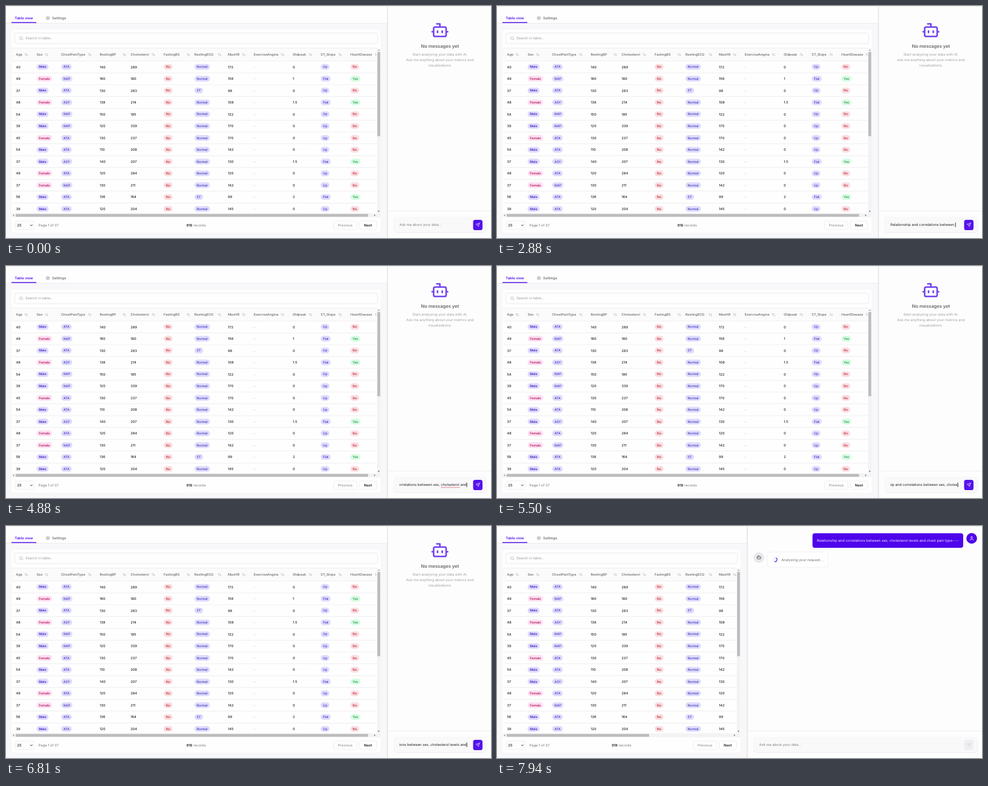
An HTML page for the animation above (8 s loop, 800 by 383 pixels).

```html
<!DOCTYPE html>
<html lang="en">
<head>
<meta charset="utf-8">
<title>Table and chat</title>
<style>
html, body { margin: 0; width: 100%; height: 100%; overflow: hidden; background: #fff; }
svg { display: block; width: 100vw; height: 100vh; }
text { font-family: Inter, sans-serif; white-space: pre; text-rendering: geometricPrecision; }
</style>
</head>
<body>
<svg id="stage" viewBox="0 0 800 383"></svg>
<script>
const LOOP = 8000, SEND = 7440, WIDE = 629, NARROW = 412.5;
const PURPLE = '#5512ec', INK = '#1f1f23', GRAY = '#77777d', PALE = '#9c9ca1', LINE = '#e6e6e8';
const stage = document.getElementById('stage');

function el(parent, tag, attrs = {}) {
  const node = document.createElementNS('http://www.w3.org/2000/svg', tag);
  set(node, attrs);
  parent.appendChild(node);
  return node;
}
function set(node, attrs) {
  for (const k in attrs) node.setAttribute(k, attrs[k]);
}
const group = (parent, attrs) => el(parent, 'g', attrs);
const rect = (parent, x, y, width, height, fill, more) =>
  el(parent, 'rect', { x, y, width, height, fill, ...more });
const circle = (parent, cx, cy, r, fill, more) => el(parent, 'circle', { cx, cy, r, fill, ...more });
const path = (parent, d, fill, more) => el(parent, 'path', { d, fill, ...more });
function text(parent, x, mid, str, size = 5.83, fill = INK, weight = 400, anchor = 'start') {
  const node = el(parent, 'text', {
    x, y: mid + size * 0.36, 'font-size': size, fill, 'font-weight': weight, 'text-anchor': anchor
  });
  node.textContent = str;
  return node;
}
function clip(id) {
  return el(el(stage, 'clipPath', { id }), 'rect');
}
const show = (node, on) => set(node, { display: on ? 'inline' : 'none' });
const shift = (node, x, y = 0) => set(node, { transform: `translate(${x} ${y})` });

// 24-unit line icons, centred on x, y
function icon(parent, x, y, scale, stroke, d, width = 2) {
  return path(parent, d, 'none', {
    transform: `translate(${x} ${y}) scale(${scale}) translate(-12 -12)`,
    stroke, 'stroke-width': width, 'stroke-linecap': 'round', 'stroke-linejoin': 'round'
  });
}
const BOT = 'M12 8V4H8M6 8h12a2 2 0 0 1 2 2v8a2 2 0 0 1-2 2H6a2 2 0 0 1-2-2v-8a2 2 0 0 1 2-2zM2 14h2M20 14h2M15 13v2M9 13v2';
const USER = 'M8 7a4 4 0 1 0 8 0a4 4 0 1 0-8 0M19 21v-2a4 4 0 0 0-4-4H9a4 4 0 0 0-4 4v2';
const PLANE = 'M22 2 15 22 11 13 2 9ZM22 2 11 13';
const GLASS = 'M3 11a8 8 0 1 0 16 0a8 8 0 1 0-16 0M21 21l-4.3-4.3';
const SORT = 'M2 9l5-5 5 5M7 4v15M13 15l5 5 5-5M18 20V5';
let gear = 'M9 12a3 3 0 1 0 6 0a3 3 0 1 0-6 0';
for (let i = 0; i <= 48; i++) {
  const a = i * Math.PI / 24, r = 8.7 + 1.4 * Math.cos(8 * a);
  gear += (i ? 'L' : 'M') + (12 + r * Math.cos(a)).toFixed(2) + ' ' + (12 + r * Math.sin(a)).toFixed(2);
}

// ---- left panel ----
const tableClip = clip('table'), inputClip = clip('input');
set(inputClip, { x: 648.7, y: 350, width: 112.3, height: 24 });

const left = group(stage);
rect(left, 0, 0, 800, 383, '#f8f7f9');
rect(left, 0, 0, 800, 28, '#fefefe');
rect(left, 0, 28, 800, 0.6, LINE);
text(left, 14.3, 20, 'Table view', 5.85, PURPLE, 600);
rect(left, 9, 26.6, 41, 1.5, PURPLE);
icon(left, 69, 20, 0.29, GRAY, gear);
text(left, 76, 20, 'Settings', 5.9, '#606066', 500);

const card = rect(left, 9, 39, 609, 335, '#fefefe', { rx: 4 });
const search = rect(left, 14.5, 44.5, 598.5, 17.5, '#fefefe', { rx: 3.5, stroke: '#e3e3e6', 'stroke-width': 0.7 });
icon(left, 25.2, 53.4, 0.29, PALE, GLASS);
text(left, 32, 53.3, 'Search in table...', 5.83, PALE);

const table = group(left, { 'clip-path': 'url(#table)' });
rect(table, 9, 69.3, 620, 21.5, '#fbfbfb');
rect(table, 9, 69, 620, 0.6, LINE);

const columns = [
  ['Age', 16.5, 33.3], ['Sex', 50.5, 67], ['ChestPainType', 91, 138], ['RestingBP', 154.5, 195],
  ['Cholesterol', 205.5, 243], ['FastingBS', 260, 300.5], ['RestingECG', 310.8, 352],
  ['MaxHR', 366, 392], ['ExerciseAngina', 408.5, 456], ['Oldpeak', 473, 502],
  ['ST_Slope', 519, 551], ['HeartDisease', 568, 611]
];
for (const [name, x, sortX] of columns) {
  text(table, x, 80.2, name, 5.55, '#68686e', 500);
  icon(table, sortX, 80.3, 0.24, '#a9a9ae', SORT);
}

const pillColors = {
  Male: ['#dfdafe', '#4a1ec4'], Female: ['#fcdff0', '#b81a66'],
  No: ['#fbdde0', '#b3202c'], Yes: ['#d6fbe1', '#1a8a45']
};
function pill(x, mid, str) {
  const [bg, fg] = pillColors[str] || ['#dedcfd', '#4230b8'];
  const back = rect(table, x, mid - 4.7, 10, 9.4, bg, { rx: 4.7 });
  const weight = str.includes('ale') ? 600 : 500;
  const label = text(table, x + 3.8, mid, str, 5.2, fg, weight);
  set(back, { width: label.getComputedTextLength() + 7.6 });
}
const pillColumns = [1, 2, 5, 6, 10, 11];
const rows = `40 Male ATA 140 289 Normal 172 0 Up
49 Female NAP 160 180 Normal 156 1 Flat
37 Male ATA 130 283 ST 98 0 Up
48 Female ASY 138 214 Normal 108 1.5 Flat
54 Male NAP 150 195 Normal 122 0 Up
39 Male NAP 120 339 Normal 170 0 Up
45 Female ATA 130 237 Normal 170 0 Up
54 Male ATA 110 208 Normal 142 0 Up
37 Male ASY 140 207 Normal 130 1.5 Flat
48 Female ATA 120 284 Normal 120 0 Up
37 Female NAP 130 211 Normal 142 0 Up
58 Male ATA 136 164 ST 99 2 Flat
39 Male ATA 120 204 Normal 145 0 Up`.split('\n');
rows.forEach((row, i) => {
  const mid = 100.5 + 19.53 * i;
  const [age, sex, pain, bp, chol, ecg, hr, peak, slope] = row.split(' ');
  const cells = [age, sex, pain, bp, chol, 'No', ecg, hr, '-', peak, slope, slope === 'Up' ? 'No' : 'Yes'];
  rect(table, 9, mid - 9.9, 620, 0.6, LINE);
  cells.forEach((cell, c) => {
    const x = columns[c][1];
    if (pillColumns.includes(c)) pill(x, mid, cell);
    else text(table, x, mid, cell, 5.6, cell === '-' ? PALE : INK, 500);
  });
});

// scrollbars and footer
const hTrack = rect(left, 9.5, 342.3, 608, 6.4, '#f3f3f4');
const hThumb = rect(left, 16, 343.3, 580, 4.6, '#bcbcbe');
path(left, 'M13.2 344.2v2.8l-1.9-1.4z', '#777');
const anchored = group(left);
rect(anchored, 612, 70, 6, 272.3, '#f3f3f4');
rect(anchored, 612.6, 76, 4.6, 139, '#bcbcbe');
path(anchored, 'M613.4 73.9h2.8l-1.4-1.9z', '#999');
path(anchored, 'M613.4 338h2.8l-1.4 1.9z', '#555');
path(anchored, 'M607.4 344.2v2.8l1.9-1.4z', '#555');
const button = { rx: 3, stroke: '#e8e8ea', 'stroke-width': 0.7 };
rect(anchored, 540.3, 355, 38.5, 14, '#fefefe', button);
text(anchored, 559.6, 362, 'Previous', 5.85, '#96969b', 500, 'middle');
rect(anchored, 583.3, 355, 28, 14, '#fefefe', button);
text(anchored, 597.2, 362, 'Next', 5.85, INK, 600, 'middle');
rect(left, 15, 355, 31.3, 14, '#fefefe', button);
text(left, 18.3, 362, '25', 5.85, INK, 500);
path(left, 'M40 361l1.9 1.9 1.9-1.9', 'none', { stroke: '#222', 'stroke-width': 0.9 });
text(left, 53.5, 362, 'Page 1 of 37', 5.75, GRAY);
const records = text(left, 313.6, 362, '', 5.75, GRAY, 400, 'middle');
el(records, 'tspan', { fill: INK, 'font-weight': 600 }).textContent = '918';
el(records, 'tspan').textContent = ' records';

// ---- chat panel ----
const chat = group(stage);
const chatBack = rect(chat, WIDE, 0, 400, 383, '#fdfdfd');
const chatFoot = rect(chat, WIDE, 337.8, 400, 0.7, LINE);
const divider = rect(chat, WIDE - 0.4, 0, 1.2, 383, '#dcdcde');
rect(stage, 0, 0, 800, 0.8, '#e9e9eb');

const empty = group(chat);
icon(empty, 715.7, 39.9, 1.29, '#7243ee', BOT);
text(empty, 715.8, 66.5, 'No messages yet', 7.55, '#68686d', 600, 'middle');
['Start analyzing your data with AI.', 'Ask me anything about your metrics and', 'visualizations.']
  .forEach((str, i) => text(empty, 715.8, 80.1 + 9 * i, str, 5.85, '#a0a0a5', 400, 'middle'));

const talk = group(chat);
const bubble = rect(talk, 517, 12, 252, 24, '#4f05eb', { rx: 4 });
const lines = Array.from({ length: 8 }, () => text(talk, 0, 0, '', 5.83, '#eee6ff'));
circle(talk, 783, 20.4, 8.8, '#4f05eb');
icon(talk, 783, 20.4, 0.35, '#fff', USER);
const reply = group(talk);
circle(reply, 432, 52, 8.8, '#e9e9ec');
icon(reply, 432, 51.7, 0.35, '#4a4a50', BOT);
rect(reply, 446, 43, 100.5, 25, '#fefefe', { rx: 4, stroke: '#ededf0', 'stroke-width': 0.7 });
circle(reply, 458.6, 55.6, 3.2, 'none', { stroke: '#e9e4f6', 'stroke-width': 0.9 });
const spin = path(reply, 'M0 -3.2A3.2 3.2 0 0 1 0 3.2', 'none', { stroke: PURPLE, 'stroke-width': 1.1 });
text(reply, 469, 55.6, 'Analyzing your request...', 5.87, '#737379');

const inputShade = rect(chat, 640, 349.8, 152.3, 25, '#efeff1', { rx: 4.5 });
const inputBox = rect(chat, 640, 349, 152, 25, '#f9f9fa', { rx: 4, stroke: '#f0f0f2', 'stroke-width': 0.6 });
const hint = text(chat, 649, 361.4, 'Ask me about your data...', 5.77, '#808086');
const field = group(chat, { 'clip-path': 'url(#input)' });
const entry = text(field, 649, 361.4, '', 5.83, INK);
const caret = rect(field, 649, 357.4, 0.8, 7.6, '#111');
const wave = path(field, '', 'none', { stroke: '#e0364a', 'stroke-width': 0.7 });
const send = rect(chat, 770.5, 353, 15.5, 17, PURPLE, { rx: 3.6 });
const plane = icon(chat, 778.3, 361.4, 0.29, '#fff', PLANE);

// ---- typing: first key, last key, text or number of deletions ----
const keys = [
  [130, 560, 'Rela'], [750, 1190, 'tions'], [1380, 2130, 'hip and correla'], [2190, 2880, 'tions between '],
  [3060, 3190, 'se'], [3380, 4130, 'x, cholsetero'], [4310, 4310, 'l'], [4500, 4880, ' and'],
  [5060, 5600, 11], [5660, 6060, 'esterol'], [6120, 6500, ' levels'],
  [6690, 7300, ' and chest pain type'], [7380, 7380, '----']
];
function typed(t) {
  let str = '';
  for (const [from, to, what] of keys) {
    if (t < from) break;
    const total = what.length || what;
    const n = t >= to ? total : Math.floor((t - from) / (to - from) * (total - 1) + 1e-6) + 1;
    str = what.length ? str + what.slice(0, n) : str.slice(0, -n);
  }
  return str;
}
const message = typed(SEND);
entry.textContent = message;
const fullWidth = entry.getComputedTextLength();

function drawInput(t) {
  const str = t < SEND ? typed(t) : '';
  show(hint, !str);
  show(field, str);
  entry.textContent = str;
  const width = str ? entry.getComputedTextLength() : 0;
  const x = Math.min(649, 759.7 - width);
  set(entry, { x });
  set(caret, { x: x + width });
  const word = 'cholseterol', at = str.indexOf(word + ' ');
  show(wave, at >= 0);
  if (at >= 0) {
    const start = x + entry.getSubStringLength(0, at);
    const end = start + entry.getSubStringLength(at, word.length);
    let d = `M${start} 365.6`;
    for (let p = start, s = 1; p < end; p += 1.2, s = -s) d += `q.6 ${s} 1.2 0`;
    set(wave, { d });
  }
}

function wrap(width) {
  const out = [''];
  const perChar = fullWidth / message.length;
  if (fullWidth <= width) return [message];
  for (const word of message.split(' ')) {
    const last = out[out.length - 1], next = last ? last + ' ' + word : word;
    if (next.length * perChar <= width || !last) out[out.length - 1] = next;
    else out.push(word);
  }
  return out;
}

function drawTalk(t, split) {
  const parts = wrap(769 - split - 48 - 14.4);
  lines.forEach((line, i) => { line.textContent = parts[i] || ''; });
  const width = Math.max(...lines.map(l => l.textContent ? l.getComputedTextLength() : 0)) + 14.4;
  const extra = (parts.length - 1) * 9.4;
  set(bubble, { x: 769 - width, width, height: 24 + extra });
  lines.forEach((line, i) => set(line, { x: 769 - width + 7.2, y: 25.9 + 9.4 * i }));
  shift(reply, split - NARROW, extra);
  set(spin, { transform: `translate(458.6 55.6) rotate(${(t - 7940) * 0.36 + 20})` });
}

function layout(split) {
  const d = split - WIDE;
  set(card, { width: 609 + d });
  set(search, { width: 598.5 + d });
  set(tableClip, { x: 9.3, y: 68, width: 602.5 + d, height: 274.3 });
  set(hTrack, { width: 608 + d });
  const view = 602 + d;
  set(hThumb, { width: (view - 15) * view / 608 });
  shift(anchored, d);
  set(records, { x: 313.6 + d / 2 });
  set(chatBack, { x: split });
  set(chatFoot, { x: split });
  set(divider, { x: split - 0.4 });
  set(inputBox, { x: 640 + d, width: 152 - d });
  set(inputShade, { x: 640 + d, width: 152.3 - d });
  set(hint, { x: 649 + d });
}

function draw(t) {
  const sent = t >= SEND;
  const p = Math.min(1, Math.max(0, (t - SEND) / 360));
  const split = WIDE + (NARROW - WIDE) * p * p * (3 - 2 * p);
  layout(split);
  drawInput(t);
  show(empty, !sent);
  show(talk, sent);
  if (sent) drawTalk(t, split);
  set(send, { fill: sent ? '#f0eef2' : PURPLE });
  set(plane, { stroke: sent ? '#d3cddb' : '#fff' });
}

function tick() {
  draw(performance.now() % LOOP);
  requestAnimationFrame(tick);
}
tick();
</script>
</body>
</html>
```
